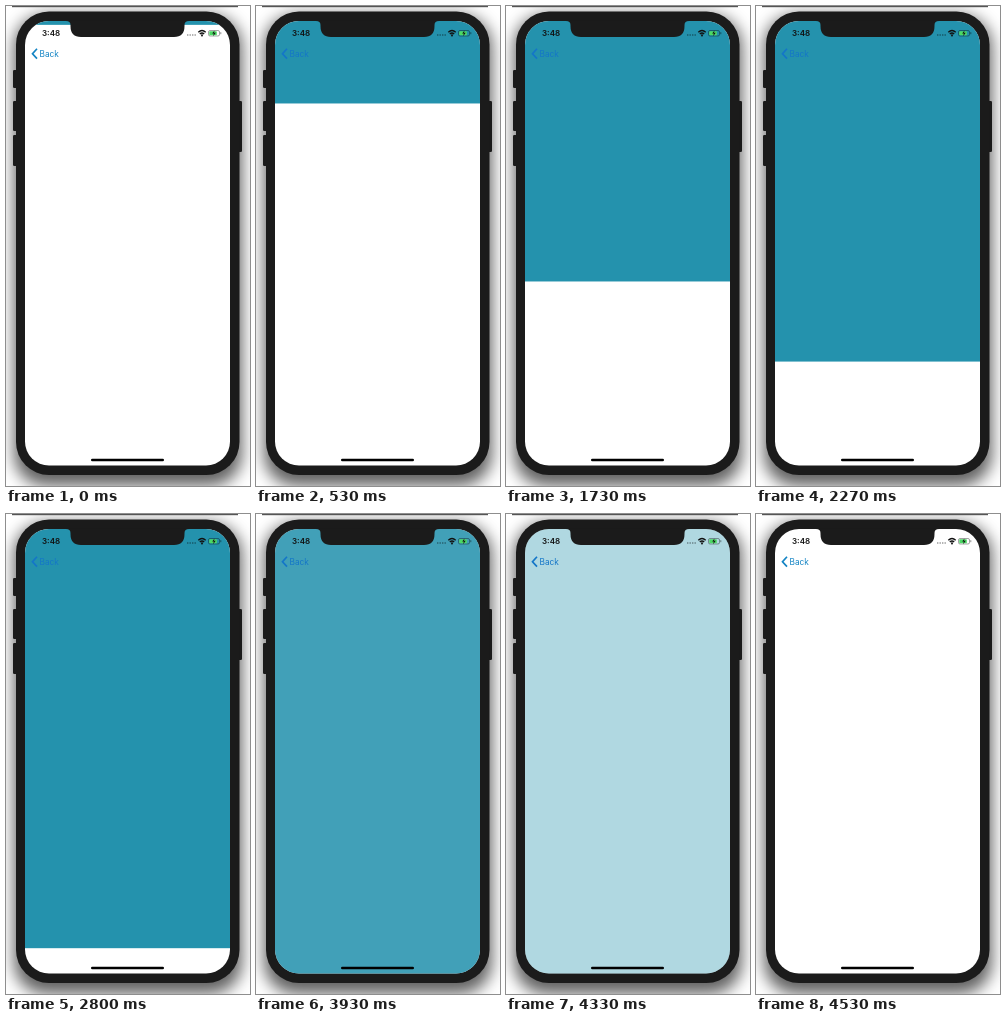
These frames come from a looping animation (244x480 px, 4.87 s). An HTML page:

```html
<!DOCTYPE html>
<html lang="en">
<head>
<meta charset="utf-8">
<title>Filling screen</title>
<style>
  html, body { margin: 0; width: 100%; height: 100%; overflow: hidden; background: #fff; }
  svg { display: block; width: 100%; height: 100%; }
  text { font-family: Inter, "Liberation Sans", sans-serif; }
  .shadow { filter: blur(8px); }
</style>
</head>
<body>
<svg viewBox="0 0 244 480">
  <defs>
    <clipPath id="screen"><rect x="19" y="15" width="205" height="444.5" rx="24"/></clipPath>
  </defs>

  <rect class="shadow" x="8" y="9" width="228" height="471" rx="32" fill="#000" opacity=".62"/>
  <rect x="6" width="226" height="1.2" fill="#555"/>

  <!-- phone body and side buttons -->
  <g fill="#1b1b1b">
    <rect x="7" y="64" width="5" height="18" rx="1.2"/>
    <rect x="7" y="95" width="5" height="30" rx="1.2"/>
    <rect x="7" y="129" width="5" height="31" rx="1.2"/>
    <rect x="231" y="95" width="5" height="51" rx="1.2"/>
    <rect x="10" y="5.5" width="223.5" height="463.5" rx="33"/>
  </g>

  <g clip-path="url(#screen)">
    <rect x="19" y="15" width="205" height="445" fill="#fff"/>
    <rect id="fill" x="19" y="15" width="205" height="0" fill="#2492ad"/>
  </g>
  <path d="M60 14.5H183V15Q178.500 15 178.500 19V20Q178.500 31 168 31H75Q64.500 31 64.500 20V19Q64.500 15 60 15Z" fill="#1b1b1b"/>

  <!-- status bar -->
  <text x="36" y="30.300" font-size="8" font-weight="600" fill="#111">3:48</text>
  <path d="M181 29h9" stroke="#000" stroke-opacity=".4" stroke-width="1.3" stroke-dasharray="1.4 1.1"/>
  <g fill="none" stroke="#111" stroke-width="1.3">
    <path d="M192.300 26.300Q196 22.700 199.700 26.300M193.800 28Q196 25.900 198.200 28"/>
    <circle cx="196" cy="29.400" r=".4"/>
  </g>
  <rect x="202.500" y="24.500" width="11" height="5.500" rx="1.5" fill="none" stroke="#000" stroke-opacity=".45" stroke-width=".8"/>
  <rect x="203.300" y="25.300" width="7.500" height="4" rx=".6" fill="#4cd964"/>
  <path d="M214.800 26.200v2" stroke="#000" stroke-opacity=".45"/>
  <path d="M208.500 24.500l-2.300 3.100h1.600l-.6 2.600 2.500-3.400h-1.700z" fill="#111"/>

  <!-- navigation and home bar -->
  <g id="back" fill="#1484c4" stroke="#1484c4">
    <path d="M31 42.800L26.500 47.700L31 52.600" fill="none" stroke-width="1.7"/>
    <text x="33.500" y="50.900" font-size="8.300" stroke="none">Back</text>
  </g>
  <rect x="85" y="452.700" width="73" height="2.600" rx="1.3" fill="#000"/>
</svg>

<script>
  const LOOP = 4870, FADE_START = 3670, FADE_END = 4530;
  const fill = document.getElementById('fill');
  const back = document.getElementById('back');
  const clamp = v => Math.min(1, Math.max(0, v));

  function draw(now) {
    const t = now % LOOP;
    const fade = clamp((t - FADE_START) / (FADE_END - FADE_START)) ** 1.7; // ease-in
    const height = 445 * clamp((t + 25) / 3000);
    const tint = height > 38 && fade < 1 ? '#1476c8' : '#1484c4';
    fill.setAttribute('height', height);
    fill.setAttribute('opacity', 1 - fade);
    back.setAttribute('fill', tint);
    back.setAttribute('stroke', tint);
  }

  const start = performance.now();
  function tick() {
    draw(performance.now() - start);
    requestAnimationFrame(tick);
  }
  tick();
</script>
</body>
</html>
```
